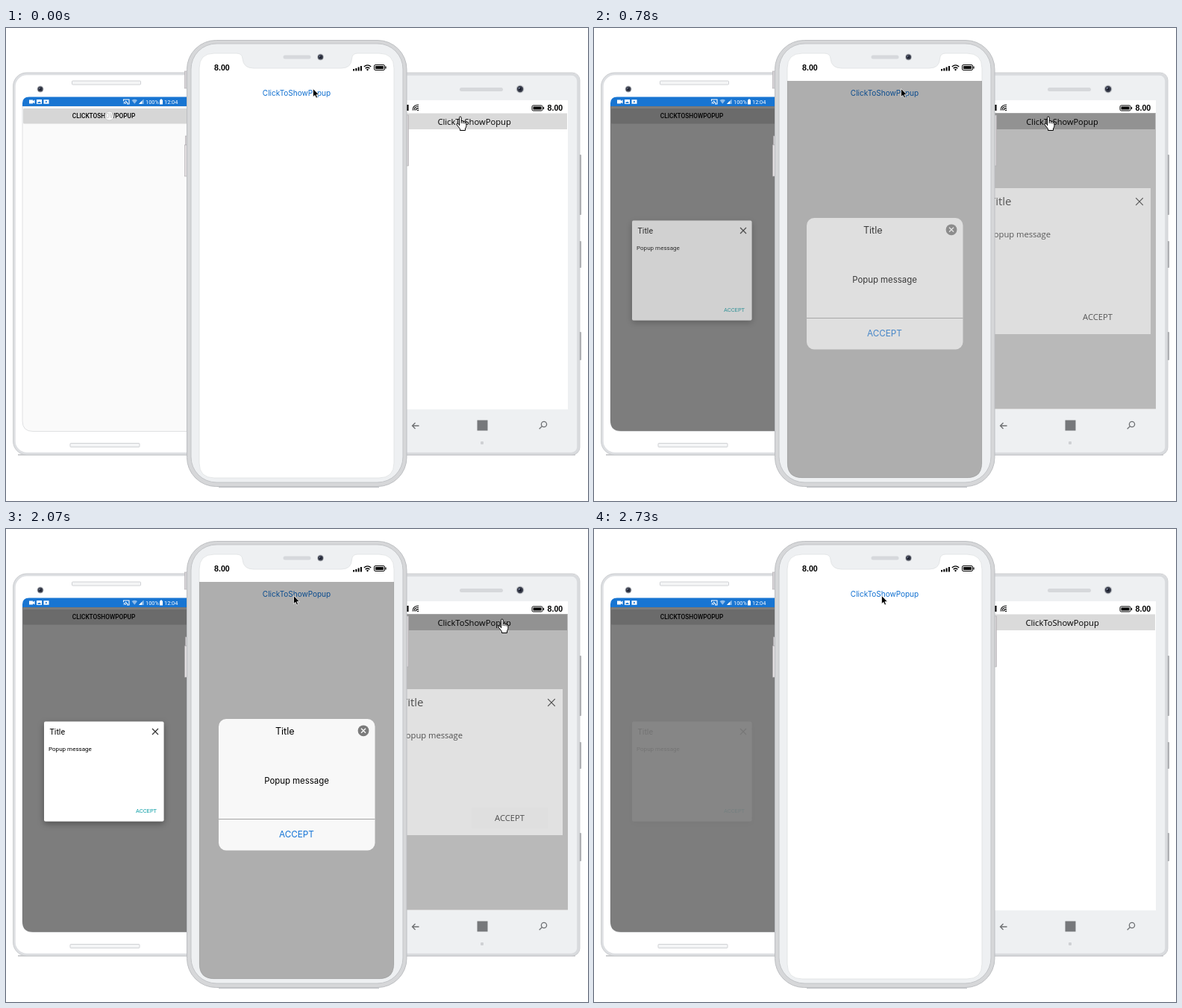
These frames come from a looping animation (780 px wide and 635 px high, 2.76 s). An HTML page:

```html
<!DOCTYPE html>
<html lang="en">
<head>
<meta charset="utf-8">
<title>Popup on three phones</title>
<style>
html, body { margin: 0; width: 100%; height: 100%; overflow: hidden; background: #fff; }
svg { display: block; width: 780px; height: 635px; }
.roboto { font-family: Roboto, sans-serif; }
.inter { font-family: Inter, sans-serif; }
.open { font-family: "Open Sans", sans-serif; }
.clock { font: bold 10.7px "Liberation Sans", sans-serif; }
.mid { text-anchor: middle; }
.end { text-anchor: end; }

.anim { animation: 2760ms linear infinite both; }
.hard { animation-timing-function: step-end; }
.a-dim { animation-name: a-dim; }
.a-pop { animation-name: a-pop; }
.a-dot1 { animation-name: a-dot1; }
.a-dot2 { animation-name: a-dot2; }
.i-dim { animation-name: i-dim; }
.i-pop { animation-name: i-pop; }
.i-link { animation-name: i-link; }
.w-dim { animation-name: w-dim; }
.w-pop { animation-name: w-pop; }
.w-accept { animation-name: w-accept; }
.w-btn { animation-name: w-btn; }
.w-label { animation-name: w-label; transform-origin: 628px 125px; }
.arrow { animation-name: arrow; }
.hand { animation-name: hand; }
.hand-on { animation-name: hand-on; }

@keyframes a-dim { 0% { opacity: 0 } 17.4%, 100% { opacity: 1 } }
@keyframes a-pop {
  0%, 18.1% { opacity: 0 } 33.7%, 81.5% { opacity: 1 }
  92.4% { opacity: .3 } 99% { opacity: .07 } 100% { opacity: 0 }
}
@keyframes a-dot1 { 0%, 10.9% { opacity: .8 } 16.3%, 100% { opacity: 0 } }
@keyframes a-dot2 { 0%, 79% { opacity: 0 } 81%, 90% { opacity: .4 } 92.4% { opacity: .25 } 95%, 100% { opacity: 0 } }
@keyframes i-dim { 0% { opacity: 0 } 21.7% { opacity: 1 } 93.5%, 100% { opacity: 0 } }
@keyframes i-pop { 0%, 22.1% { opacity: 0 } 31.4%, 83.8% { opacity: 1 } 93.2%, 100% { opacity: 0 } }
@keyframes i-link { 0%, 17.3% { opacity: 1 } 17.4%, 22.9% { opacity: .25 } 27.5%, 100% { opacity: 1 } }
@keyframes w-dim { 0% { opacity: 0 } 25% { opacity: 1 } 81.5%, 100% { opacity: 0 } }
@keyframes w-pop { 0%, 25% { opacity: 0 } 31.2%, 70.7% { opacity: 1 } 81%, 100% { opacity: 0 } }
@keyframes w-accept { 0%, 31.2% { opacity: 0 } 34.8%, 70.7% { opacity: 1 } 75% { opacity: .1 } 77%, 100% { opacity: 0 } }
@keyframes w-btn { 0% { fill: #dadada } 15.2% { fill: #7f7f7f } 25% { fill: #c9c9c9 } 81.5%, 100% { fill: #dadada } }
@keyframes w-label { 0% { transform: none } 15.2% { transform: scale(.98) } 47.1%, 100% { transform: none } }
@keyframes arrow { 0%, 69.6% { transform: translate(0, 0) } 73.9%, 100% { transform: translate(-26px, 8px) } }
@keyframes hand {
  0%, 45.65% { transform: translate(0, 0) } 55.4%, 58.7% { transform: translate(35px, 7px) }
  62%, 100% { transform: translate(56px, 2px) }
}
@keyframes hand-on { 0% { opacity: 1 } 95.65%, 100% { opacity: 0 } }
</style>
</head>
<body>
<svg viewBox="0 0 780 635">
  <defs>
    <filter id="shade" x="-20%" y="-20%" width="140%" height="140%">
      <feDropShadow dx="0" dy="3" stdDeviation="4" flood-opacity=".35"/>
    </filter>
    <g id="camera">
      <circle r="4.500" fill="#bfc2c6"/><circle r="3.500" fill="#3b3f4d"/><circle r="1.600" fill="#171b2a"/>
      <circle cx="-1" cy="-1" r=".8" fill="#8b96b0"/>
    </g>
    <g id="battery">
      <rect x=".5" y=".5" width="14" height="7" rx="1.6" fill="none" stroke="#000"/>
      <rect x="2" y="2" width="11" height="4" fill="#000"/><path d="M15.4 2.5h1.2v3h-1.2z"/>
    </g>
    <path id="cross" d="M-4-4 4 4M4-4-4 4"/>
  </defs>

  <!-- left phone -->
  <g class="roboto">
    <path d="M16 573H250" stroke="#bcbec1" stroke-width="1.500"/>
    <rect x="11" y="61.500" width="260" height="510" rx="17" fill="#fff" stroke="#dddfe2" stroke-width="3.400"/>
    <rect x="9.600" y="60" width="262.800" height="513" rx="18" fill="none" stroke="#c6c8cb" stroke-width=".8"/>
    <g fill="#f4f5f6" stroke="#d0d2d5">
      <rect x="88.500" y="71" width="92" height="5" rx="1"/>
      <rect x="86" y="557.500" width="93" height="5" rx="1"/>
    </g>
    <use href="#camera" x="46" y="82"/>
    <path d="M22 105H250V541.500H36Q22 541.500 22 527.500Z" fill="#fafafa" stroke="#d9dadc" stroke-width=".8"/>
    <rect x="23" y="108" width="225" height="20.500" rx="1.500" fill="#d6d6d6"/>
    <text class="mid" x="131" y="121" font-size="8.300" font-weight="500">CLICKTOSHOWPOPUP</text>
    <circle class="anim a-dot1" cx="138.500" cy="118" r="6" fill="#fff" stroke="#bbb" stroke-width=".8"/>
    <path class="anim hard a-dim" d="M22 105H250V541H36Q22 541 22 527Z" fill-opacity=".5"/>
    <circle class="anim a-dot2" cx="142" cy="111" r="6" fill="#ddd"/>
    <path d="M22 105V101Q22 92.500 31 92.500H250V105Z" fill="#1875d2"/>
    <g fill="#fff">
      <path d="M31 96.500h5v1.500l2.500-1.500v5l-2.500-1.500v1.500h-5z"/>
      <path fill-rule="evenodd" d="M41 96h7v6h-7zM42 101h5l-1.800-2.500-1.200 1.300-.8-.8z"/>
      <path fill-rule="evenodd" d="M50.500 96.300h7v5.500h-7zM53 97.500v3l2.500-1.500z"/>
      <path d="M178 102 184.500 95.500V102Z" fill-opacity=".55"/><path d="M178 102l4-4v4z"/>
      <path d="M206 96.500h1v-1h2v1h1v6h-4z"/>
      <path d="M168.500 97q4-2.500 7.500 0l-3.700 4.800z" fill-opacity=".5"/>
      <g font-size="7.400"><text x="187" y="102">100%</text><text x="212" y="102">12:04</text></g>
    </g>
    <path d="M157.500 98v-2h7.500v6h-3M157.500 99.500q2.500 0 2.500 2.500M157.500 101.500h.8M160 98l3 3" fill="none" stroke="#fff" stroke-width="1.100"/>

    <g class="anim a-pop">
      <rect x="51" y="258.500" width="160.500" height="134" rx="2" fill="#fff" filter="url(#shade)"/>
      <text x="58.500" y="276" font-size="10.600">Title</text>
      <use href="#cross" x="200" y="272" stroke="#333" stroke-width="1.200"/>
      <text x="57" y="297.500" font-size="8.050">Popup message</text>
      <text x="174" y="380.500" font-size="7.500" fill="#089da5">ACCEPT</text>
    </g>
  </g>

  <!-- right phone -->
  <g class="open">
    <path d="M530 573H763" stroke="#bcbec1" stroke-width="1.500"/>
    <g fill="#a9abae">
      <rect x="768" y="170" width="3" height="81" rx="1"/>
      <rect x="768" y="286" width="3" height="36" rx="1"/>
      <rect x="768" y="408" width="3" height="38" rx="1"/>
    </g>
    <rect x="500" y="62" width="267" height="509.500" rx="9" fill="#eef0f2" stroke="#d9dbde" stroke-width="3.600"/>
    <rect x="500" y="60" width="269" height="513" rx="10" fill="none" stroke="#c3c5c8" stroke-width=".8"/>
    <rect x="608" y="80" width="58" height="5" rx="2.500" fill="#d6d8db"/>
    <use href="#camera" transform="translate(689 82) scale(1.2)"/>
    <rect x="530" y="97" width="223" height="415" fill="#fff"/>
    <path d="M537 103h2.500v8h-2.500z"/>
    <path d="M545 110.500q0-7 8-7.500M547 110.500q0-5 6-5.200M549 110.500q.2-2.700 4-2.900" fill="none" stroke="#000" stroke-width="1.100"/>
    <path d="M550.500 111q.2-1.500 2.500-1.500V111z"/>
    <use href="#battery" x="704.500" y="103.500"/>
    <text class="clock" x="725.500" y="111">8.00</text>
    <rect class="anim hard w-btn" x="530" y="114.500" width="222" height="21.500"/>
    <text class="mid anim hard w-label" x="627.600" y="130" font-size="11.200">ClickToShowPopup</text>
    <rect class="anim hard w-dim" x="530" y="114" width="223" height="397.500" fill-opacity=".275"/>

    <g class="anim w-pop">
      <rect x="520" y="215" width="226" height="196" fill="#fff"/>
      <text class="end" x="559.500" y="238" font-size="15">Title</text>
      <use href="#cross" transform="translate(731 233) scale(1.2)" stroke="#000" stroke-width="1"/>
      <text class="end" x="612" y="280.500" font-size="11.200">Popup message</text>
      <rect class="anim w-accept" x="624" y="374" width="102.500" height="28" fill="#dadada"/>
      <text class="mid" x="675" y="392" font-size="11.200">ACCEPT</text>
    </g>

    <g fill="none" stroke="#6d6f72" stroke-width="1.300">
      <path d="M553.500 534h-9M548.500 530l-4 4 4 4"/>
      <circle cx="721" cy="532" r="3.600"/><path d="M718.400 534.600l-3.700 3.700"/>
    </g>
    <rect x="631.500" y="526.500" width="14" height="14" fill="#76787b"/>
    <rect x="636" y="555" width="4" height="4" rx="1" fill="#cfd1d4"/>
  </g>

  <!-- centre phone -->
  <g class="inter">
    <g fill="#d5d2d5" stroke="#aaa7ab" stroke-width=".6">
      <rect x="239.500" y="58" width="4" height="23"/>
      <rect x="240.500" y="145" width="3" height="12"/>
      <rect x="239.500" y="157" width="4" height="42" fill="#e3dfe1"/>
      <rect x="535" y="117" width="4.500" height="68"/>
    </g>
    <path d="M285 616.500H500" stroke="#c9cbce" stroke-width="1.500"/>
    <rect x="242.500" y="16.500" width="294.500" height="599" rx="39" fill="#d6d7d9" stroke="#bcbec1"/>
    <rect x="248" y="21" width="284" height="589" rx="34" fill="#eef0f2" stroke="#c3c5c8"/>
    <path d="M279 34H309Q316.500 34 317 41Q318 54 332 54H449Q463 54 463.500 41Q464 34 471 34H500Q520 34 520 54V584Q520 604 500 604H279Q259 604 259 584V54Q259 34 279 34Z" fill="#fff" stroke="#dfe1e3" stroke-width=".8"/>
    <rect x="371.500" y="36.500" width="37" height="5" rx="2.500" fill="#d6d8dc"/>
    <use href="#camera" x="421.500" y="39"/>
    <text class="clock" x="279" y="57">8.00</text>
    <path d="M465 55h2v2.500h-2zM468.300 54h2v3.500h-2zM471.600 52.500h2v5h-2zM474.900 51h2v6.500h-2z"/>
    <path d="M479.800 52q4.700-4.300 9.400 0M481.600 54.200q2.900-2.500 5.800 0" fill="none" stroke="#000" stroke-width="1.300"/>
    <path d="M482.900 55.700q1.600-1.300 3.200 0l-1.600 1.800z"/>
    <use href="#battery" x="493" y="49"/>
    <text class="mid anim i-link" x="389.500" y="90.700" font-size="10" fill="#0f6fd0">ClickToShowPopup</text>
    <path class="anim hard i-dim" d="M259 71H520V584Q520 604 500 604H279Q259 604 259 584Z" fill-opacity=".318"/>

    <g class="anim i-pop">
      <rect x="285" y="255" width="209.500" height="176.500" rx="10" fill="#f8f8f8"/>
      <text class="mid" x="373.800" y="275.700" font-size="12.600">Title</text>
      <circle cx="479" cy="270.800" r="7.400" fill="#7b7b7b"/>
      <use href="#cross" transform="translate(479 270.800) scale(.75)" stroke="#fff" stroke-width="1.700"/>
      <text class="mid" x="389.500" y="342.400" font-size="11.400">Popup message</text>
      <path d="M285 389.500H494.500" stroke="#a4a4a4"/>
      <text class="mid" x="389.500" y="414.300" font-size="11.700" fill="#1273d6">ACCEPT</text>
    </g>
  </g>

  <!-- pointers -->
  <path class="anim arrow" d="M411.500 81.500V92.500L414 90.300 415.700 94 417.500 93.200 415.900 89.600H419.300Z" stroke="#fff" stroke-width=".7"/>
  <g class="anim hard hand-on">
    <path class="anim hand" d="M607.500 131V120.500Q607.500 119 608.800 119T610.200 120.500V125Q612.300 123.700 612.700 125.500 614.600 124.500 615 126.300 616.800 125.700 616.900 127.500V131.500Q616.900 133 615.500 135V137.500H608.500V135.500L604.200 130Q603.400 128.400 604.800 128 606 127.800 607.500 130M610.200 125V128M612.700 125.500V128.200M615 126.300V128.500" fill="#fff" stroke="#000" stroke-width="1" stroke-linejoin="round"/>
  </g>
</svg>
</body>
</html>
```
